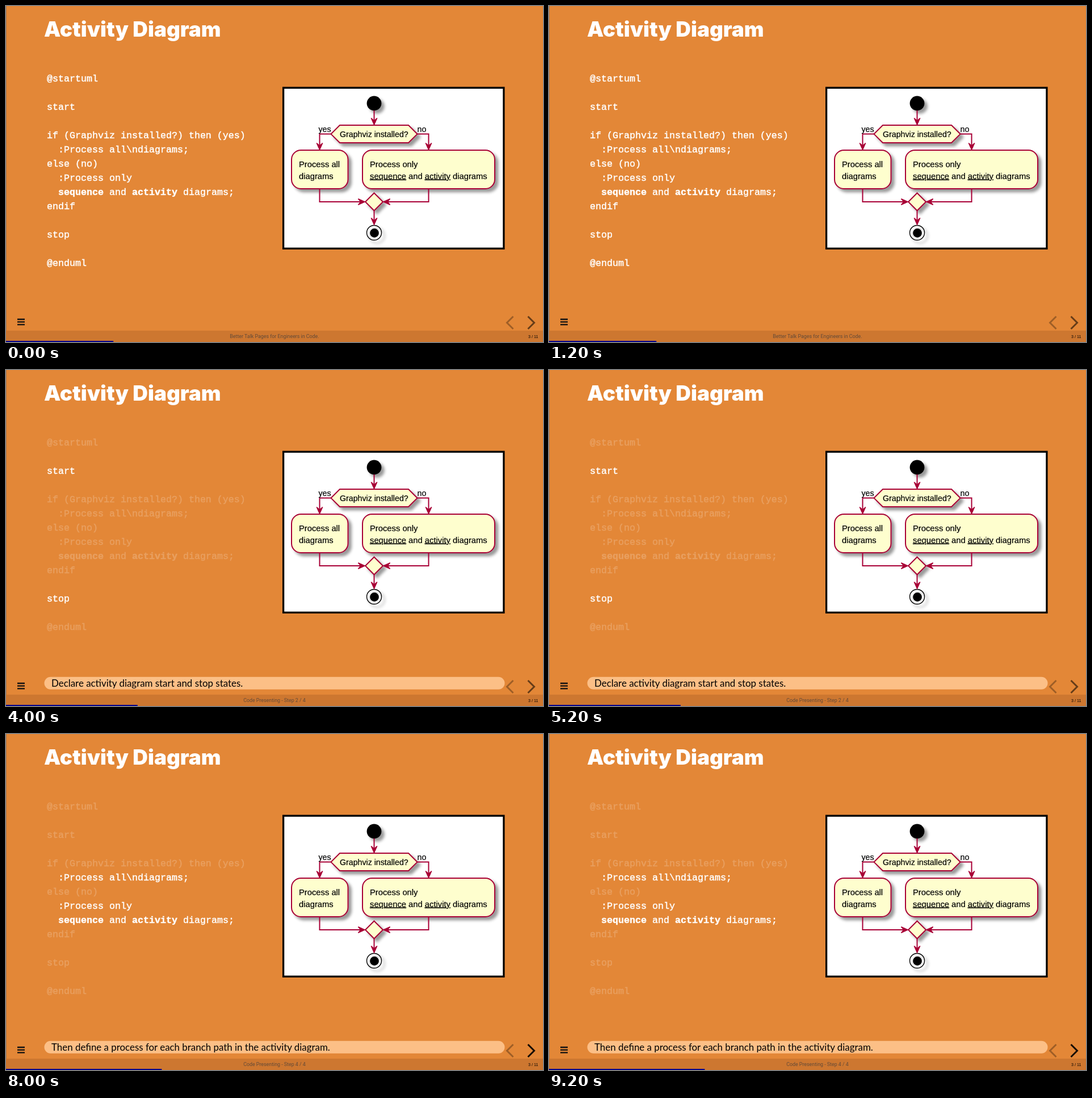
Recreate the animation shown at these times as an HTML page. Size 946x592 px, loop 10000 ms.

```html
<!DOCTYPE html>
<html lang="en">
<head>
<meta charset="utf-8">
<title>Activity Diagram</title>
<style>
  html, body { margin: 0; width: 100%; height: 100%; overflow: hidden; background: #e38737; }
  svg { display: block; width: 946px; height: 592px; }
  text { white-space: pre; }
  .title { font: 900 36.9px Inter, sans-serif; fill: #fff; }
  .code { font: 16.67px "Liberation Mono", monospace; fill: #fff; stroke: #fff; stroke-width: .45px; }
  .code tspan { font-weight: 700; }
  .label, .action { font: 14.2px "Liberation Sans", sans-serif; stroke: #000; stroke-width: .2px; }
  .action { font-size: 14.75px; }
  .action tspan { text-decoration: underline; text-decoration-skip-ink: none; }
  .caption { font: 16.9px Lato, sans-serif; }
  .caption tspan { font-style: italic; }
  .footer { font: 8.85px Roboto, sans-serif; fill: #634a38; text-anchor: middle; }
  .page { font: 7.2px "Liberation Sans", sans-serif; text-anchor: end; }
  .node { fill: #fefece; stroke: #a80036; stroke-width: 2; filter: url(#shadow); }
  .edge { fill: none; stroke: #a80036; stroke-width: 2; }
  .head { fill: #a80036; stroke: #a80036; stroke-width: 1.3; }
  .chevron { fill: none; stroke: #000; stroke-width: 3; }
</style>
</head>
<body>
<svg viewBox="0 0 946 592">
  <defs>
    <filter id="shadow" x="-50%" y="-50%" width="200%" height="200%">
      <feDropShadow dx="5.3" dy="5.3" stdDeviation="2.4" flood-opacity=".4"/>
    </filter>
    <path id="arrow" class="head" d="M-5.3-12.6 0-.7 5.3-12.6 0-8z"/>
  </defs>

  <rect width="946" height="592" fill="#e38737"/>
  <rect width="1" height="592" fill="#a87a52"/>
  <text class="title" x="67" y="54">Activity Diagram</text>
  <g id="code"></g>

  <rect x="488.6" y="144.1" width="388.3" height="283.2" fill="#fff" stroke="#000" stroke-width="3.3"/>
  <circle cx="648.5" cy="171.5" r="12.9" filter="url(#shadow)"/>
  <path class="node" d="M588 210H709L724.5 225.6 709 241H588L572.5 225.6z"/>
  <rect class="node" x="503" y="254" width="99.5" height="68" rx="16.5"/>
  <rect class="node" x="628" y="254" width="233" height="68" rx="16.5"/>
  <path class="node" d="M648.5 329.5 664 345 648.5 360.5 633 345z"/>
  <circle cx="648.5" cy="399.5" r="13" fill="none" stroke="#000" stroke-width="1.4" filter="url(#shadow)"/>
  <circle cx="649" cy="400" r="7.9"/>
  <path class="edge" d="M648.5 184V204M572.5 225.6H552.5V248M724.5 225.6H744.5V248
    M552.5 322V345H627M744.5 322V345H670M648.5 360.5V380"/>
  <g id="arrows"></g>
  <text class="label" x="588" y="231">Graphviz installed?</text>
  <text class="label" x="550.5" y="221.5">yes</text>
  <text class="label" x="724.5" y="221.5">no</text>
  <text class="action" x="516" y="283.5">Process all</text>
  <text class="action" x="516" y="304.5">diagrams</text>
  <text class="action" x="641" y="283.5">Process only</text>
  <text class="action" x="641" y="304.5"><tspan>sequence</tspan> and <tspan>activity</tspan> diagrams</text>

  <g id="note">
    <rect x="67.5" y="540.8" width="811" height="22" rx="11" fill="#fcbf86"/>
    <text id="caption" class="caption" x="80" y="557.7"></text>
  </g>
  <path d="M20 552H33M20 556.7H33M20 561.4H33" stroke="#111" stroke-width="2.3"/>
  <path class="chevron" d="M893.5 547 882.5 558 893.5 569" opacity=".3"/>
  <path id="next" class="chevron" d="M919.5 547 930.5 558 919.5 569"/>

  <rect y="572" width="946" height="20" fill="#cd7730"/>
  <text id="footer" class="footer" x="473" y="584.6"></text>
  <text class="page" x="937.5" y="585">3 / 11</text>
  <rect id="progress" y="590" height="2" fill="#00008b"/>
</svg>
<script>
const $ = id => document.getElementById(id);
const em = word => `<tspan>${word}</tspan>`;
const STEP_MS = 2000;

// Each line: row, step that highlights it, text
const lines = [
  [0, 1, '@startuml'],
  [2, 2, 'start'],
  [4, 3, 'if (Graphviz installed?) then (yes)'],
  [5, 4, '  :Process all\\ndiagrams;'],
  [6, 3, 'else (no)'],
  [7, 4, '  :Process only'],
  [8, 4, `  ${em('sequence')} and ${em('activity')} diagrams;`],
  [9, 3, 'endif'],
  [11, 2, 'stop'],
  [13, 1, '@enduml']
];

const captions = [
  '',
  'Start with opening and closing PlantUML delimiters.',
  'Declare activity diagram start and stop states.',
  `Use ${em('if')}, ${em('then')}, and ${em('else')} keywords to define logical branches.`,
  'Then define a process for each branch path in the activity diagram.'
];

// Tip position and rotation from pointing down
const arrows = [
  [648.5, 210, 0], [552.5, 254, 0], [744.5, 254, 0],
  [633, 345, -90], [664, 345, 90], [648.5, 386, 0]
];

$('code').innerHTML = lines.map(([row, , text]) =>
  `<text class="code" x="72" y="${132.5 + row * 25}">${text}</text>`).join('');
$('arrows').innerHTML = arrows.map(([x, y, turn]) =>
  `<use href="#arrow" transform="translate(${x} ${y}) rotate(${turn})"/>`).join('');

let shown = -1;

function show(step) {
  if (step === shown) return;
  shown = step;
  lines.forEach(([, active], i) => {
    $('code').children[i].setAttribute('opacity', !step || step === active ? 1 : 0.2);
  });
  $('note').setAttribute('visibility', step ? 'visible' : 'hidden');
  $('caption').innerHTML = captions[step];
  $('footer').textContent = step
    ? `Code Presenting - Step ${step} / 4`
    : 'Better Talk Pages for Engineers in Code.';
  $('next').setAttribute('opacity', step === 4 ? 0.9 : 0.55);
  $('progress').setAttribute('width', 946 * (0.2 + 0.0225 * step));
}

const start = performance.now();

function tick() {
  const elapsed = performance.now() - start;
  show(Math.floor(elapsed / STEP_MS) % captions.length);
  requestAnimationFrame(tick);
}
tick();
</script>
</body>
</html>
```
